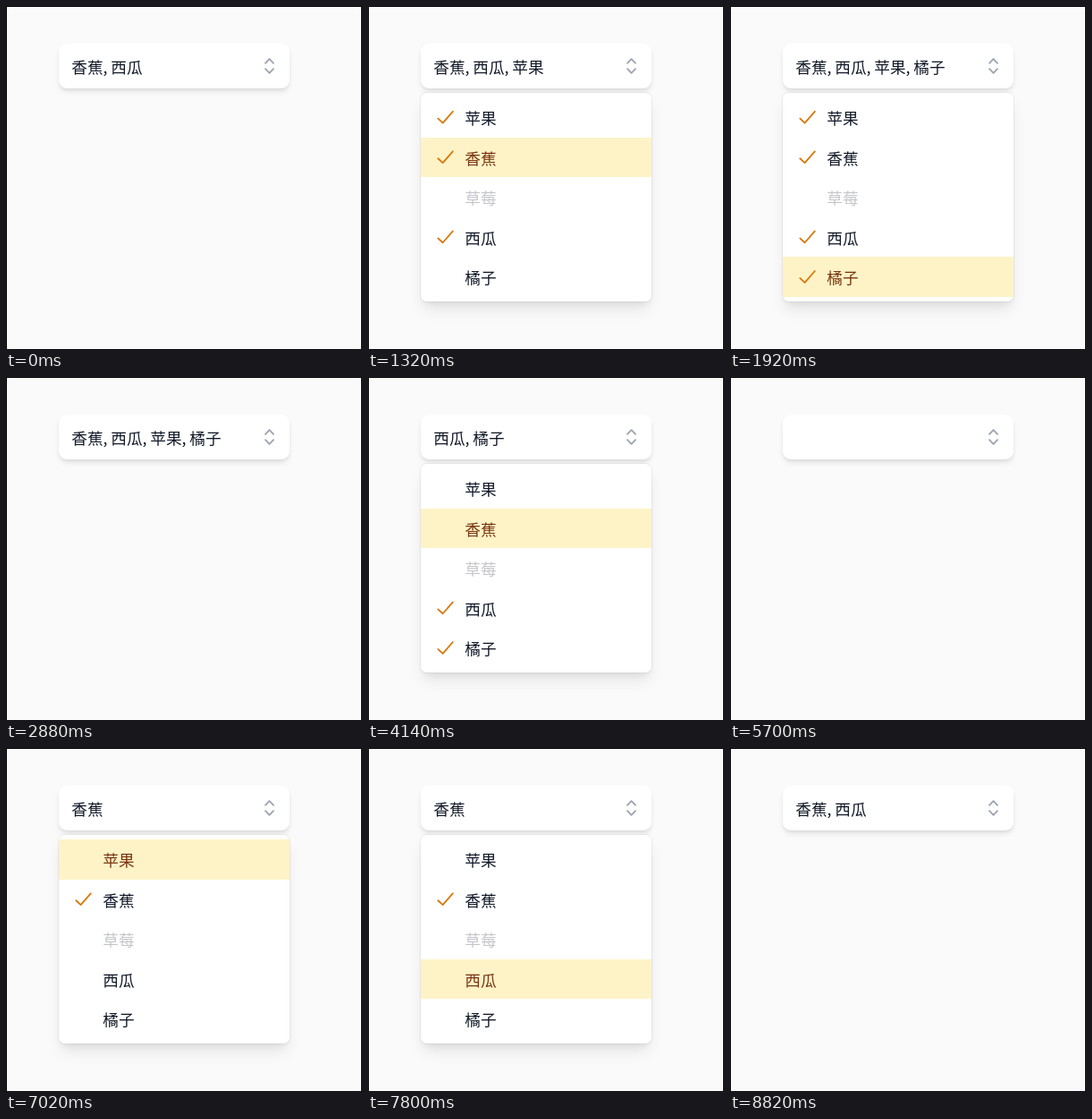
Recreate the animation shown at these times as an HTML page. Size 398 px wide and 383 px high, loop 9.72 s.

```html
<!DOCTYPE html>
<html lang="zh-CN">
<head>
<meta charset="utf-8">
<title>Listbox</title>
<style>
  html, body { margin: 0; width: 100%; height: 100%; overflow: hidden; background: #fafafa; }
  #stage {
    position: absolute; left: 0; top: 0; width: 398px; height: 383px; overflow: hidden;
    box-sizing: border-box; border: 1px solid #000; border-bottom: 0;
  }
  .card, svg { position: absolute; }
  .card { left: 58px; width: 258px; background: #fff; }
  #button {
    top: 41px; height: 50px; border-radius: 9px;
    box-shadow: 0 4.4px 6.7px -1.1px rgba(0,0,0,.1), 0 2.2px 4.4px -1.1px rgba(0,0,0,.06);
  }
  #panel {
    top: 96px; height: 233px; border-radius: 6.7px;
    box-shadow: 0 0 0 1px rgba(0,0,0,.05), 0 11px 16.7px -3.3px rgba(0,0,0,.1),
      0 4.4px 6.7px -2.2px rgba(0,0,0,.05);
  }
  svg { left: 0; top: 0; width: 258px; height: 100%; overflow: visible; }
  text { font: 17.6px "Noto Sans CJK SC", "Noto Sans CJK", sans-serif; fill: #111827; white-space: pre; }
  path { fill: none; stroke-width: 1.8; stroke-linecap: round; stroke-linejoin: round; }
  .arrows { stroke: #9ca3af; }
  .check { stroke: #d97706; }
  .row rect { fill: none; }
  .active rect { fill: #fef3c7; }
  .active text { fill: #78350f; }
  .disabled text { fill: #c4c6ca; }
</style>
</head>
<body>
<div id="stage">
  <div id="button" class="card">
    <svg>
      <text id="label" x="14.3" y="33"></text>
      <path class="arrows" d="M231 21.8l4.5-4.6 4.5 4.6M231 28.2l4.5 4.6 4.5-4.6"/>
    </svg>
  </div>
  <div id="panel" class="card"><svg id="list"></svg></div>
</div>
<script>
const LOOP = 9720, ROW = 44.55;
const fruits = ['苹果', '香蕉', '草莓', '西瓜', '橘子'];
const [APPLE, BANANA, BERRY, MELON, ORANGE] = fruits.keys();
const NONE = -1;

// Each event is [time, action, value]; "toggle" picks the active fruit.
const events = [
  [480, 'open', BANANA], [720, 'hover', APPLE], [1080, 'toggle'],
  [1320, 'hover', BANANA], [1440, 'hover', NONE], [1500, 'hover', MELON], [1620, 'hover', ORANGE],
  [1920, 'toggle'], [2160, 'hover', MELON], [2280, 'hover', NONE],
  [2760, 'fade', .94], [2820, 'fade', .31], [2880, 'fade', 0],

  [3240, 'open', APPLE], [3480, 'hover', BANANA], [3720, 'toggle'],
  [3840, 'hover', APPLE], [4080, 'toggle'],
  [4140, 'hover', BANANA], [4200, 'hover', NONE], [4260, 'hover', MELON], [4560, 'toggle'],
  [4620, 'hover', ORANGE], [4920, 'toggle'], [5100, 'hover', MELON], [5220, 'hover', NONE],
  [5640, 'fade', .6], [5700, 'fade', 0],

  [6180, 'open', NONE], [6360, 'hover', APPLE], [6420, 'hover', BANANA], [6660, 'toggle'],
  [7020, 'hover', APPLE], [7080, 'hover', NONE], [7500, 'hover', APPLE], [7620, 'hover', NONE],
  [7800, 'hover', MELON], [8160, 'toggle'], [8340, 'hover', NONE],
  [8760, 'fade', .6], [8820, 'fade', 0],
];

function stateAt(time) {
  const state = { picked: [BANANA, MELON], active: NONE, opacity: 0 };
  for (const [start, action, value] of events) {
    if (start > time) break;
    if (action === 'fade') state.opacity = value;
    else if (action === 'toggle') {
      const { picked, active } = state;
      state.picked = picked.includes(active) ? picked.filter(i => i !== active) : [...picked, active];
    } else {
      state.active = value;
      if (action === 'open') state.opacity = 1;
    }
  }
  return state;
}

const byId = id => document.getElementById(id);
const label = byId('label'), panel = byId('panel'), list = byId('list');

list.innerHTML = fruits.map((name, i) => {
  const top = Math.round(5 + i * ROW), bottom = Math.round(5 + (i + 1) * ROW);
  return `<g class="row${i === BERRY ? ' disabled' : ''}">
    <rect y="${top}" width="258" height="${bottom - top}"/>
    <text x="49.3" y="${35 + i * ROW}">${name}</text>
    <path class="check" transform="translate(0 ${i * ROW})" d="M19.3 28.7l5.3 4.9 11.2-12.8"/>
  </g>`;
}).join('');
const rows = [...list.children];

function draw() {
  const { picked, active, opacity } = stateAt(performance.now() % LOOP);
  label.textContent = picked.map(i => fruits[i]).join(', ');
  panel.style.opacity = opacity;
  rows.forEach((row, i) => {
    row.classList.toggle('active', i === active);
    row.querySelector('.check').style.display = picked.includes(i) ? '' : 'none';
  });
  requestAnimationFrame(draw);
}
draw();
</script>
</body>
</html>
```
